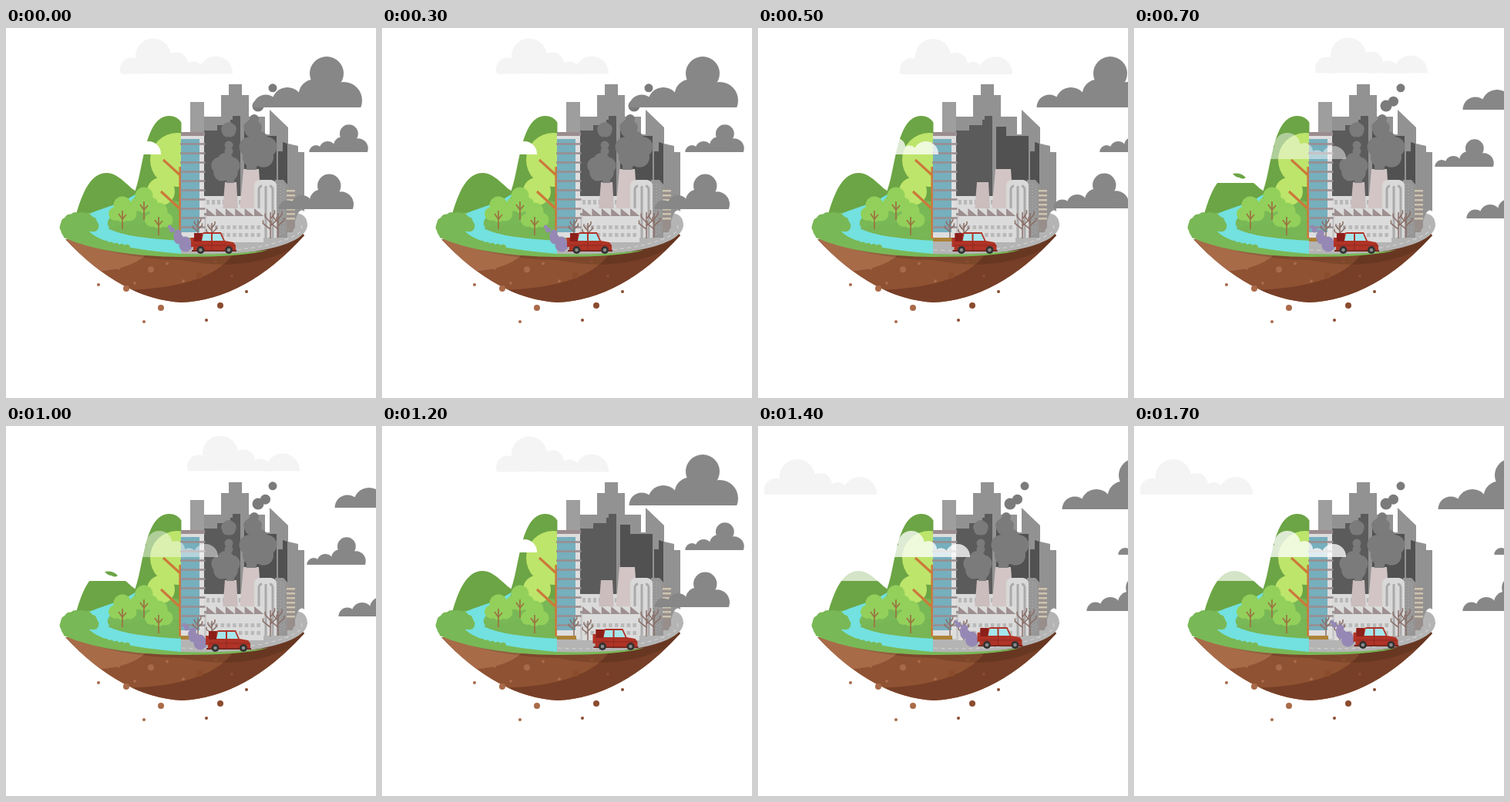
Animation, 480 px wide and 480 px high, one loop 1900 ms. Source, as an HTML page:

```html
<!DOCTYPE html>
<html lang="en">
<head>
<meta charset="utf-8">
<title>Two halves of an island</title>
<style>
html, body { margin: 0; width: 100%; height: 100%; overflow: hidden; background: #fff; }
svg { display: block; width: 100%; height: 100%; }
</style>
</head>
<body>
<svg viewBox="0 0 480 480">
  <defs>
    <clipPath id="left"><path d="M0 0H227.500V480H0z"/></clipPath>
    <clipPath id="soil"><path id="bowl" d="M77 274Q150 352 228 356Q312 352 387 269L380 262 230 282z"/></clipPath>
    <clipPath id="aboveBase"><path d="M-2 -80H150V0H-2z"/></clipPath>
    <g id="softCloud" clip-path="url(#aboveBase)"></g>
    <g id="darkCloud" clip-path="url(#aboveBase)"></g>
  </defs>

  <!-- soil -->
  <use href="#bowl" fill="#8f5232"/>
  <g clip-path="url(#soil)">
    <path d="M70 260H199Q190 316 105 316z" fill="#a86b48"/>
    <path d="M302 280Q278 338 150 340L228 370L400 330V260z" fill="#773f27"/>
    <path d="M70 268Q140 300 228 301Q310 318 372 286L400 255z" opacity=".13"/>
  </g>
  <g id="stones"></g>

  <!-- green half -->
  <g clip-path="url(#left)" fill="#6ca545">
    <path d="M88 252C94 232 104 188 130 188C150 188 161 213 178 216L195 255z"/>
    <path d="M160 225C180 205 174 114 212 114Q222 114 228 123V255H160z"/>
    <path d="M72 262Q82 240 116 239L164 222L178 215L228 226V297Q130 296 75 272z" fill="#79b856"/>
    <path d="M172 213Q160 222 141 229L118 237L103 243Q118 251 118 257L108 264Q128 285 228 293V276Q160 273 134 259Q128 250 139 243Q133 237 160 229z" fill="#72e1df"/>
    <path d="M132 260Q150 253 228 251V274Q160 274 132 260z" fill="#78b554"/>
    <g id="canopy" fill="#bde56b"></g>
    <path d="M226 180V273M226 191L204 171M226 235L201 212" fill="none" stroke="#cc793b" stroke-width="3.2"/>
    <g id="trees"></g>
    <g id="bush" fill="#79b856"></g>
  </g>

  <!-- grey half -->
  <path d="M227 240H373Q391 240 391 256C389 280 330 296 227 296z" fill="#b4b4b4"/>
  <path d="M227 293Q290 295 340 288Q310 297 227 297z" fill="#79b856"/>
  <path d="M228 288Q300 292 345 280T383 256" fill="none" stroke="#d0d0d0" stroke-width="1.2" stroke-dasharray="5 4"/>
  <path d="M239 96H257V140H239z" fill="#9e9e9e"/>
  <path d="M257 115H279V87H289V73H306V87H315V115H336V138H342V106L366 129V150L379 153V161H387V238Q378 230 372 265H257z" fill="#929292"/>
  <path d="M257 133H274V126H291V119H294V114H304V225H257z" fill="#5b5b5b"/>
  <path d="M309 128H322V140H351V215H309zM353 160H359V148L365 150V205H353z" fill="#515151"/>
  <path d="M257 218H312V240H257z" fill="#dadada"/>
  <g id="windows" fill="#b9b9b9"></g>
  <path d="M284 200H299L301 238H281z" fill="#cbbdbd"/>
  <path d="M308 183H328L332 240H303z" fill="#d3c5c5"/>
  <path d="M349 197H360L365 203V272H349z" fill="#969696"/>
  <path d="M352 202V268M356 202V268M360 204V268" stroke="#aaa" stroke-dasharray="2 2"/>
  <path d="M364 208H375V259L370 265H364z" fill="#988f8d"/>
  <path d="M369.500 210V250" stroke="#cbc4b0" stroke-width="11" stroke-dasharray="2.500 3.500"/>
  <path d="M322 203Q323 197 331 197H344Q351 198 351 205V272H322z" fill="#d9d9d9"/>
  <path d="M328 272V209Q329 205 332 205M337 272V205M346 272V209Q345 205 342 205" fill="none" stroke="#aaa" stroke-width="3"/>
  <path d="M253 243H260V278H253z" fill="#c8c8c8"/>
  <path d="M260 234H334V278H260z" fill="#dbdbdb"/>
  <path id="roof" fill="#9e8f90"/>
  <g id="panes" fill="#b9b9b9"></g>
  <path d="M227 135H257V276H227z" fill="#dedede"/>
  <path d="M227 144H251V265H227z" fill="#76afbd"/>
  <path id="floors" stroke="#9b8d8f" stroke-width="2.6"/>
  <path d="M227 135H258V140H227z" fill="#9b8d8f"/>
  <path d="M227 272H252V277H227z" fill="#ae8338"/>
  <g id="bareTrees" fill="none" stroke="#8a6e67" stroke-width="1.5"></g>

  <!-- moving parts -->
  <g id="smoke" fill="#7b7b7b"></g>
  <g id="hillCap">
    <path d="M104 201L112 180H148L160 201z" fill="#fff"/>
    <path id="sliver" d="M128 189Q138 187 145 194Q141 197 137 194Q132 194 128 189z" fill="#6ca545"/>
  </g>
  <g id="softClouds"></g>
  <g id="car">
    <g id="fumes" fill="#9588b5"></g>
    <path d="M240 272H244V266H254L257 265H279L284 276L295 278L298 282V290H243V284H240z" fill="#b03326"/>
    <path d="M244 266H254V277H244z" fill="#8c1f1a"/>
    <path d="M256 267H266V276H254zM268 267H278L282 276H268z" fill="#a5e6ec"/>
    <path d="M244 282H297M267 277V288" stroke="#8c2820"/>
    <path d="M241 289H299" stroke="#7c2820" stroke-width="2"/>
    <g id="wheels"></g>
  </g>
  <g id="darkClouds" fill="#878787"></g>
</svg>
<script>
const $ = id => document.getElementById(id);
const fill = (id, markup) => { $(id).innerHTML = markup; };
const repeat = (n, f) => Array.from({ length: n }, (_, i) => f(i)).join('');
const dot = (x, y, r, color) => `<circle cx="${x}" cy="${y}" r="${r}"${color ? ` fill="${color}"` : ''}/>`;
const box = (x, y, w, h) => `<rect x="${x}" y="${y}" width="${w}" height="${h}"/>`;
// n circles on a ring: a lumpy round shape
const blob = (x, y, ring, r, n = 5) => repeat(n, i => {
  const a = (i / n - .25) * 2 * Math.PI;
  return dot(x + ring * Math.cos(a), y + ring * Math.sin(a), r);
});

// Bumps are [x, height, radius] above a flat base.
const cloud = bumps => {
  const [from, to] = [bumps[0][0], bumps[bumps.length - 1][0]];
  return bumps.map(([x, h, r]) => dot(x, -h, r)).join('') + box(from, -9, to - from, 9);
};
fill('softCloud', cloud([[15, 6, 15], [43, 23, 23], [73, 13, 15], [95, 3, 13], [124, 1, 22]]));
fill('darkCloud', cloud([[17, 0, 16.5], [45, 6, 20], [80, 16, 20.5], [96, 44, 22], [118, 9, 24]]));

// Soil
const loose = [[120, 333], [156, 338], [179, 381], [201, 363], [260, 379], [278, 360], [312, 342]];
const stone = (x, y, r) => dot(x, y, r, x < 240 ? '#a96a49' : '#8b4c2e');
fill('stones', loose.map(([x, y], i) => stone(x, y, i % 2 ? 4 : 2)).join('') +
  repeat(9, i => stone(125 + 21 * i, 317 + 14 * Math.sin(i * 1.9 + 4), i % 3 ? 2 : 4)));

// Plants
fill('canopy', dot(222, 171, 35) + dot(201, 212, 18));
fill('bush', repeat(9, i => {
  const a = Math.PI * (.85 + i * .14);
  return dot(95 + 18 * Math.cos(a), 258 + 12 * Math.sin(a), 7.5);
}) + repeat(12, i => dot(80 + i * 7, 265 + 20 * Math.sin(i / 8), 6 - i * .2)) + dot(95, 260, 14));

const tree = ([x, y]) =>
  `<g fill="#92d05b">${dot(x, y, 11.5)}${dot(x - 9, y + 11, 9)}${dot(x + 9, y + 11, 9.5)}${dot(x, y + 13, 9)}</g>` +
  `<path d="M${x} ${y + 31}V${y + 7}m-5 4l5 7l5 -6" fill="none" stroke="#9a7743" stroke-width="1.8"/>`;
fill('trees', [[179, 218], [151, 230], [198, 238]].map(tree).join(''));

const bareTree = ([x, y, h]) => `<path d="M${x} ${y}v${-h}` + repeat(4, i => {
  const side = i % 2 ? 1 : -1, w = side * h * (.28 - i * .04);
  return `M${x} ${y - h * (.35 + i * .13)}l${w} ${-h * .22}v${-h * .12}`;
}) + '"/>';
fill('bareTrees', [[249, 272, 23], [267, 278, 25], [343, 273, 34], [353, 272, 32]].map(bareTree).join(''));

// Buildings
fill('windows', repeat(7, i => box(260 + i * 7, 223, 4, 6)));
fill('panes', repeat(18, i => box(263 + i % 9 * 7.8, i < 9 ? 256 : 266, 4.5, 5)));
$('roof').setAttribute('d', repeat(6, i => `M${260 + i * 12.4} 234l12.400 10h-12.400z`));
$('floors').setAttribute('d', repeat(10, i => `M226 ${150.500 + i * 12}h32.500`));

// Smoke and car
fill('smoke', blob(285, 181, 8, 11) + blob(289, 156, 4, 5.5, 2) + blob(289, 132, 3, 7) + box(286, 190, 10, 11) +
  blob(327, 158, 12, 13) + blob(320, 130, 4, 8) + dot(322, 118, 6) + box(312, 170, 13, 14) +
  repeat(3, i => dot(327 + 9.5 * i, 101 - i * i * 5.8, 7.5 - i)));
fill('fumes', repeat(7, i => dot(233 - 3.2 * i + 3 * Math.sin(i * 2), 282 - 4 * i, 8.5 - i)));
fill('wheels', [252.5, 289].map(x => dot(x, 288, 5, '#333') + dot(x, 288, 2.3, '#8b8b8b')).join(''));

// The scene holds one of five poses; each cloud path has one offset per pose.
const ends = [500, 700, 1200, 1400, 1900];
const home = [0, 0];
const clouds = [
  { id: 'hill', kind: 'soft', color: '#fff', at: [93, 164], size: .74, path: [home, [33, 0], [74, 6], home, [74, 6]] },
  { id: 'sky', kind: 'soft', color: '#f4f4f4', at: [148, 59.5], size: 1, path: [home, [36, .5], [87, -1], home, [-140, 29.5]] },
  { id: 'high', kind: 'dark', at: [320, 103], size: 1, path: [home, [41, 0], [106, 3], home, [74, 5]] },
  { id: 'middle', kind: 'dark', at: [393, 161], size: .54, path: [home, [50, 0], [-3, 19], home, [74, 6]] },
  { id: 'low', kind: 'dark', at: [353, 235], size: .69, path: [home, [30, -1], [78, 12], home, [73, 5]] }
];
for (const kind of ['soft', 'dark'])
  fill(kind + 'Clouds', clouds.filter(c => c.kind === kind)
    .map(c => `<use id="${c.id}" href="#${kind}Cloud"${c.color ? ` fill="${c.color}"` : ''}/>`).join(''));

const carX = [0, 11.5, 19, 33.5, 44.5];
const haze = [1, .77, .46, 1, .77];
const cap = [0, 0, 1, 0, .7];
const move = (id, x, y, size = 1) => $(id).setAttribute('transform', `translate(${x} ${y}) scale(${size})`);
const fade = (id, value) => $(id).setAttribute('opacity', +value);

function render(t) {
  const pose = ends.findIndex(end => t < end);
  const smoky = pose % 2 === 0;
  for (const { id, at, size, path } of clouds)
    move(id, at[0] + path[pose][0], at[1] + path[pose][1], size);
  move('car', carX[pose], Math.min(0, (22 - carX[pose]) * .18));
  fade('hill', haze[pose]);
  fade('hillCap', cap[pose]);
  fade('sliver', cap[pose] === 1);
  fade('smoke', smoky);
  fade('fumes', smoky);
}

const start = performance.now();
function tick() {
  render((performance.now() - start) % 1900);
  requestAnimationFrame(tick);
}
tick();
</script>
</body>
</html>
```
